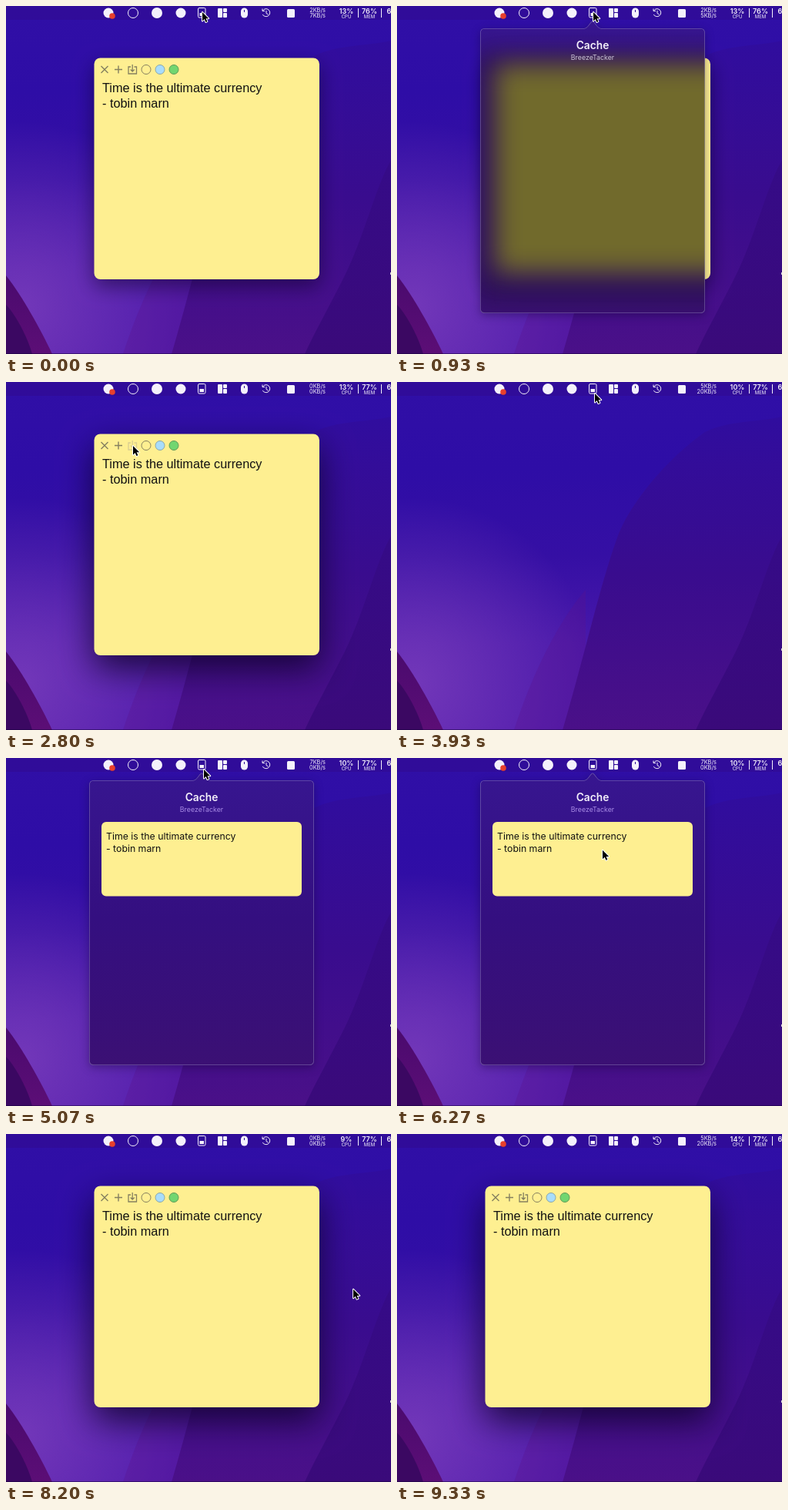
Animation, 500 px wide and 452 px high, one loop 9390 ms. Source, as an HTML page with a canvas:

```html
<!DOCTYPE html>
<html lang="en">
<head>
<meta charset="utf-8">
<title>Sticky note cache</title>
<style>
  html, body { margin: 0; width: 100%; height: 100%; overflow: hidden; background: #300da0; }
  canvas { display: block; }
</style>
</head>
<body>
<canvas id="stage" width="500" height="452"></canvas>
<script>
const W = 500, H = 452, LOOP = 9390;
const ctx = document.getElementById('stage').getContext('2d');
const layer = Object.assign(document.createElement('canvas'), { width: W, height: H });
const pop = layer.getContext('2d');

const QUOTE = ['Time is the ultimate currency', '- tobin marn'];
const YELLOW = '#feef91';
const SANS = '"Liberation Sans", Arial, sans-serif';
const UI = 'Inter, sans-serif';

// Moments of the story, in ms
const OPEN_1 = 520, CLOSE_1 = 1500, PRESS = 2600, STORE = 3000;
const OPEN_2 = 4300, CLOSE_2 = 7165, ZOOM = 250;

// Start time, upload, download, CPU, memory
const STATS = [
  [0, 2, 7, 13, 76], [600, 2, 5, 13, 76], [2000, 0, 0, 13, 77], [3400, 5, 20, 10, 77],
  [4600, 7, 0, 10, 77], [6600, 0, 0, 9, 77], [8600, 5, 20, 14, 77]
];
// Time, x, y
const POINTER = [
  [0, 255, 8], [1700, 255, 8], [2500, 165, 83], [3000, 165, 83], [3700, 257, 15],
  [5300, 257, 15], [6300, 267, 120], [7600, 267, 120], [8500, 515, 230]
];

const clamp = v => Math.max(0, Math.min(1, v));
const smooth = v => v * v * (3 - 2 * v);

function vertical(c, y0, y1, ...colors) {
  const g = c.createLinearGradient(0, y0, 0, y1);
  colors.forEach((color, i) => g.addColorStop(i / (colors.length - 1), color));
  return g;
}

function fillPath(d, fill) {
  ctx.fillStyle = fill;
  ctx.fill(new Path2D(d));
}

function strokePath(d, color, width = 1) {
  ctx.strokeStyle = color;
  ctx.lineWidth = width;
  ctx.stroke(new Path2D(d));
}

function box(c, x, y, w, h, r, fill) {
  c.beginPath();
  c.roundRect(x, y, w, h, r);
  if (fill) { c.fillStyle = fill; c.fill(); }
}

function disc(x, y, r, fill, stroke) {
  ctx.beginPath();
  ctx.arc(x, y, r, 0, 7);
  if (fill) { ctx.fillStyle = fill; ctx.fill(); }
  if (stroke) { ctx.strokeStyle = stroke; ctx.lineWidth = 1; ctx.stroke(); }
}

function text(c, str, x, y, font, color, align = 'left') {
  c.font = font;
  c.fillStyle = color;
  c.textAlign = align;
  c.fillText(str, x, y);
}

function wallpaper() {
  ctx.fillStyle = vertical(ctx, 0, H, '#300fa6', '#2e0da6', '#350fa4', '#4818aa', '#4c18aa');
  ctx.fillRect(0, 0, W, H);
  const glow = ctx.createRadialGradient(20, 390, 0, 20, 390, 240);
  glow.addColorStop(0, 'rgba(128,66,190,.75)');
  glow.addColorStop(1, 'rgba(128,66,190,0)');
  ctx.fillStyle = glow;
  ctx.fillRect(0, 0, W, H);
  fillPath('M245 270C210 310 175 380 152 452H216L245 350Z', 'rgba(90,18,140,.3)');
  fillPath('M500 45C470 52 430 50 400 65C350 100 300 160 285 205C262 270 245 350 215 452H500Z',
    vertical(ctx, 45, H, '#300d9e', '#390c8e', '#4a1088'));
  fillPath('M500 200C480 235 465 300 440 350C420 390 400 425 388 452H500Z',
    vertical(ctx, 200, H, '#350b88', '#3a0a7a'));
  fillPath('M0 350C20 375 45 420 60 452H0Z', vertical(ctx, 350, H, '#4a0a6e', '#5c0e76'));
  fillPath('M0 388C12 400 28 430 34 452H0Z', '#3b0862');
  ctx.fillStyle = 'rgba(20,0,60,.5)';
  ctx.fillRect(0, 451, W, 1);
  ctx.fillStyle = '#ddd';
  ctx.fillRect(499, 346, 1, 3);
}

function menuBar(t) {
  const white = '#f4f1fb';
  ctx.fillStyle = 'rgba(50,8,130,.35)';
  ctx.fillRect(0, 0, W, 18);

  disc(133, 9, 6.5, white);
  disc(138, 13, 3.8, '#e8402c');
  disc(165, 9, 6.5, null, white);
  disc(196, 9, 7, white);
  disc(227, 9, 6.5, white);

  box(ctx, 249.5, 2.5, 9.5, 12.5, 1.5);
  ctx.strokeStyle = white;
  ctx.lineWidth = 1;
  ctx.stroke();
  ctx.fillStyle = white;
  ctx.fillRect(251.5, 9, 5.5, 4);

  box(ctx, 275, 3, 6, 12, 1, white);
  box(ctx, 282, 3, 5, 5, 1, white);
  box(ctx, 282, 9, 5, 6, 1, white);
  box(ctx, 305, 2.5, 9, 13, 4.5, white);
  ctx.fillStyle = '#320e9a';
  ctx.fillRect(309, 5, 1, 3);
  strokePath('M333.5 6A5 5 0 1 1 333.3 11M333 3.5V6.5H336M338 6V9.5L340.5 11', white);
  box(ctx, 365, 4, 10, 11, 1.5, white);

  const [, up, down, cpu, mem] = STATS.findLast(s => t >= s[0]);
  text(ctx, up + 'KB/s', 415, 8, '7.4px ' + UI, white, 'right');
  text(ctx, down + 'KB/s', 415, 15.3, '7.4px ' + UI, white, 'right');
  for (const [value, label, x] of [[cpu, 'CPU', 442], [mem, 'MEM', 472]]) {
    text(ctx, value + '%', x, 9.5, '600 9px ' + UI, white, 'center');
    text(ctx, label, x, 16.3, '6px ' + UI, white, 'center');
    ctx.fillRect(x + 15, 3, 1, 12);
  }
  text(ctx, '6', 494.5, 9.5, '600 9px ' + UI, white);
}

function note(t) {
  const active = t > CLOSE_1 + ZOOM;
  ctx.save();
  ctx.shadowColor = active ? 'rgba(8,0,30,.75)' : 'rgba(8,0,30,.5)';
  ctx.shadowBlur = active ? 44 : 26;
  ctx.shadowOffsetY = active ? 17 : 9;
  box(ctx, 114.5, 67.5, 292.5, 287.5, 8, YELLOW);
  ctx.restore();

  const gray = '#85805f';
  strokePath('M123.5 78L132.5 87M132.5 78L123.5 87M141 82.5H151M146 77.5V87.5', gray, 1.4);
  const pressed = t > PRESS && t < STORE;
  strokePath('M162 79H159V88H169.5V79H166.5M164.2 76V85M161.7 82.5L164.2 85L166.7 82.5',
    pressed ? '#d9cd91' : gray, 1.3);
  disc(182, 82.5, 6, YELLOW, gray);
  disc(200, 82.5, 6, '#a8dcfb', '#8aa6a8');
  disc(218, 82.5, 6, '#71d670', '#5f9a58');

  QUOTE.forEach((line, i) => text(ctx, line, 125, 112 + i * 20, '16.3px ' + SANS, '#111'));
  if (t > CLOSE_2 && (t - CLOSE_2) % 1200 < 600) {
    ctx.fillStyle = '#555';
    ctx.fillRect(126 + ctx.measureText(QUOTE[1]).width, 117, 1, 18);
  }
}

const bubble = new Path2D('M114 29H243C248 29 251 19.5 254 19.5C257 19.5 260 29 265 29H394' +
  'Q400 29 400 35V393Q400 399 394 399H114Q108 399 108 393V35Q108 29 114 29Z');

// The backdrop keeps its place on the stage while the bubble zooms from the menu icon
function popover(scale, alpha, hasNote) {
  pop.clearRect(0, 0, W, H);
  pop.save();
  const zoom = () => {
    pop.translate(253.5, 17);
    pop.scale(scale, scale);
    pop.translate(-253.5, -17);
  };
  zoom();
  pop.clip(bubble);
  pop.resetTransform();
  pop.fillStyle = vertical(pop, 18, 400, '#371690', '#340f80', '#3b1074');
  pop.fillRect(0, 0, W, H);
  if (hasNote) {
    pop.filter = 'blur(16px)';
    pop.fillStyle = '#2d1058';
    pop.fillRect(100, 60, 340, 325);
    pop.fillStyle = '#716a2c';
    pop.fillRect(128, 76, 340, 270);
    pop.filter = 'none';
  }
  zoom();
  pop.strokeStyle = 'rgba(160,150,200,.5)';
  pop.lineWidth = 1.6;
  pop.stroke(bubble);
  text(pop, 'Cache', 254, 56, '600 13.8px ' + UI, '#f3effa', 'center');
  text(pop, 'BreezeTacker', 254, 69.5, '8.8px ' + UI, hasNote ? '#cbc3d8' : '#a98ce6', 'center');
  if (!hasNote) {
    box(pop, 124, 83, 260, 96.5, 6, YELLOW);
    QUOTE.forEach((line, i) => text(pop, line, 130, 105.5 + i * 16, '12.3px ' + UI, '#111'));
  }
  pop.restore();

  ctx.save();
  ctx.globalAlpha = alpha;
  ctx.shadowColor = 'rgba(10,0,40,.35)';
  ctx.shadowBlur = 12;
  ctx.shadowOffsetY = 3;
  ctx.drawImage(layer, 0, 0);
  ctx.restore();
}

function showPopover(t, opens, closes, hasNote) {
  if (t < opens || t >= closes + ZOOM) return;
  const grow = 1 - (1 - clamp((t - opens) / ZOOM)) ** 3;
  const left = 1 - clamp((t - closes) / ZOOM);
  popover(Math.max(.02, grow * left), grow * left, hasNote);
}

function pointer(t, noteShown) {
  const i = POINTER.findLastIndex(p => t >= p[0]);
  const a = POINTER[i], b = POINTER[i + 1];
  if (!b) return;
  const k = smooth((t - a[0]) / (b[0] - a[0]));
  const x = a[1] + (b[1] - a[1]) * k, y = a[2] + (b[2] - a[2]) * k;
  ctx.save();
  ctx.translate(x, y);
  ctx.lineJoin = 'round';
  if (noteShown && x > 115 && x < 407 && y > 95) {
    const beam = 'M-3 -6Q0 -6 0 -4Q0 -6 3 -6M0 -4V5M-3 7Q0 7 0 5Q0 7 3 7M-1.5 2H1.5';
    strokePath(beam, 'rgba(255,255,255,.8)', 2.6);
    strokePath(beam, '#111', 1.2);
  } else {
    const arrow = 'M0 0V11.5L2.7 9L4.5 13L6.4 12.2L4.6 8.3H8.2Z';
    strokePath(arrow, '#fff', 2);
    fillPath(arrow, '#000');
  }
  ctx.restore();
}

function draw() {
  const t = performance.now() % LOOP;
  const noteShown = t < STORE || t >= CLOSE_2;
  wallpaper();
  menuBar(t);
  if (noteShown) note(t);
  showPopover(t, OPEN_1, CLOSE_1, true);
  showPopover(t, OPEN_2, CLOSE_2, noteShown);
  pointer(t, noteShown);
  requestAnimationFrame(draw);
}
draw();
</script>
</body>
</html>
```
